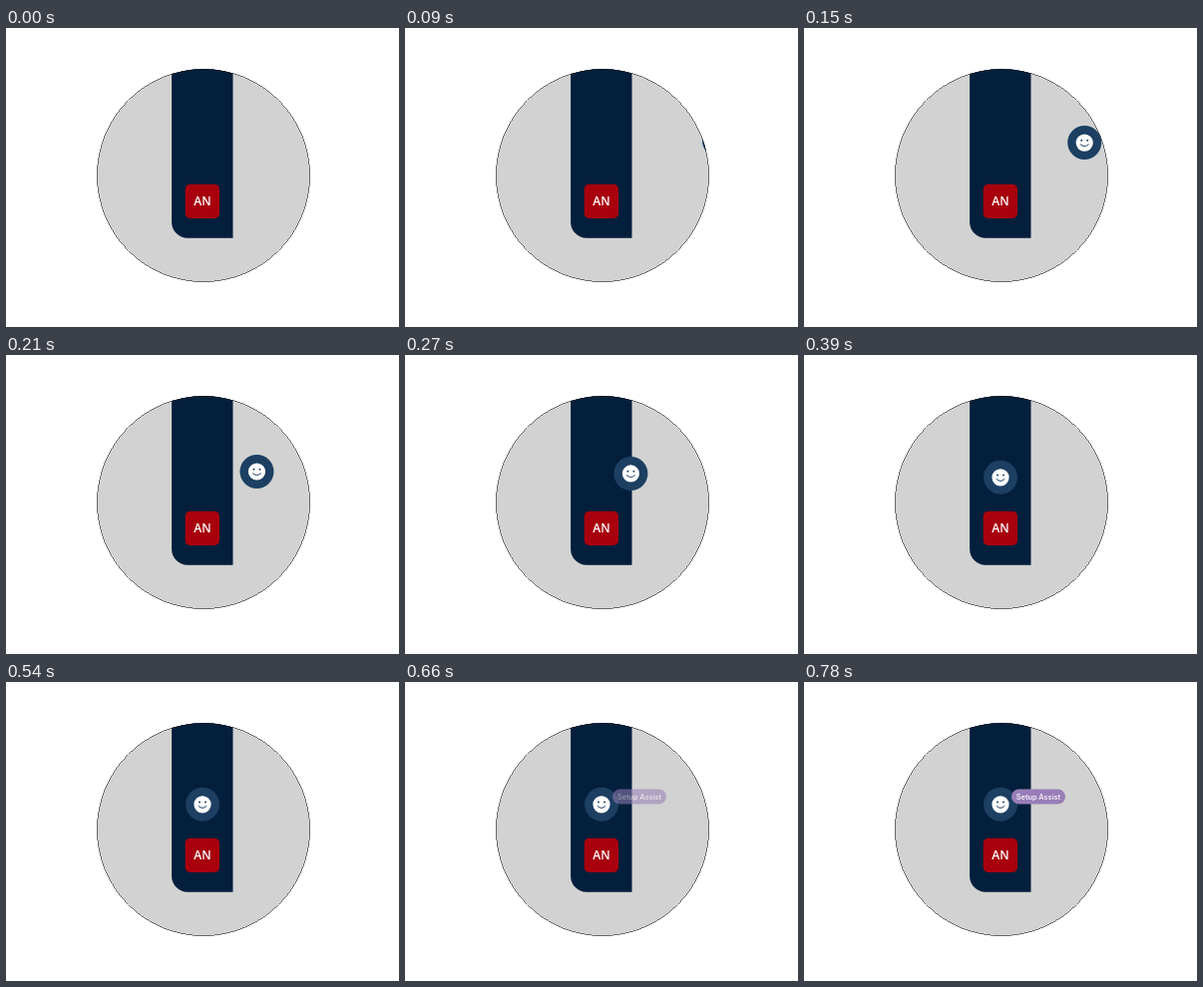
These frames come from a looping animation (394 px wide and 300 px high, 1500 ms). An HTML page:

```html
<!DOCTYPE html>
<html lang="en">
<head>
<meta charset="utf-8">
<style>
  html, body { margin: 0; width: 100%; height: 100%; overflow: hidden; background: #fff; }
  svg { display: block; }
  text { text-anchor: middle; }
  .initials { font: 600 12px "Open Sans", "Noto Sans", sans-serif; fill: #fff; }
  .label { font: 600 7.3px Inter, sans-serif; fill: #f5eff9; }
  .crisp { shape-rendering: crispEdges; }
</style>
</head>
<body>
<svg width="394" height="300" viewBox="0 0 394 300">
  <clipPath id="disc"><circle cx="198" cy="148" r="106.9"/></clipPath>
  <circle class="crisp" cx="198" cy="148" r="106.9" fill="#d1d2d1"/>
  <g clip-path="url(#disc)">
    <path d="M166.1 40H227.5V210.7H182.1A16 16 0 0 1 166.1 194.7Z" fill="#041f3c"/>
    <rect x="179.7" y="156.7" width="34.3" height="34.3" rx="5" fill="#a8000d"/>
    <text class="initials" x="197" y="178">AN</text>
    <g id="badge">
      <circle r="17" fill="#1c3f62"/>
      <circle r="8.6" fill="#fff"/>
      <g fill="#1c3f62">
        <circle cx="-3" cy="-2.2" r="1"/>
        <circle cx="3" cy="-2.2" r="1"/>
      </g>
      <path d="M-4 1.8Q0 5.6 4 1.8" fill="none" stroke="#1c3f62" stroke-linecap="round"/>
    </g>
    <g id="tip" opacity="0">
      <rect x="208" y="107.5" width="54" height="15" rx="7.5" fill="#987eb8"/>
      <text class="label" x="235" y="117.6">Setup Assist</text>
    </g>
  </g>
  <circle class="crisp" cx="198" cy="148" r="106.65" fill="none" stroke="#000" stroke-width=".5"/>
</svg>
<script>
  const LOOP = 1500, STEP = 30;
  const badge = document.getElementById('badge');
  const tip = document.getElementById('tip');
  const start = performance.now();
  const progress = (t, from, to) => Math.min(1, Math.max(0, (t - from) / (to - from)));

  function draw(now) {
    const elapsed = Math.max(0, now - start) % LOOP;
    const t = Math.floor(elapsed / STEP) * STEP;

    // The badge slides in from the right, slowing down as it sinks into place.
    const left = 1 - progress(t, 90, 388);
    const x = 197 + 118 * left ** 1.5;
    const y = 122.8 - 9.7 * left;
    badge.setAttribute('transform', `translate(${x} ${y})`);
    badge.setAttribute('visibility', t < 90 ? 'hidden' : 'visible');

    tip.setAttribute('opacity', 1 - (1 - progress(t, 600, 780)) ** 2);
    requestAnimationFrame(draw);
  }
  draw(start);
</script>
</body>
</html>
```
